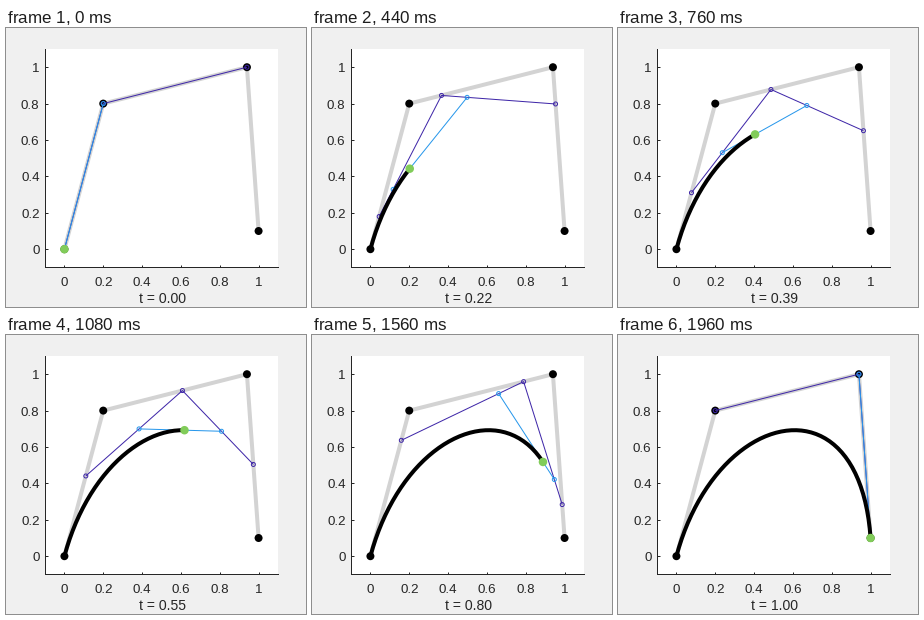
A matplotlib script for the animation above (2 s loop, 300 px wide and 279 px high).

```python
import numpy as np
import matplotlib.pyplot as plt
from matplotlib.animation import FuncAnimation

W, H, DPI = 300, 279, 100
FRAMES, INTERVAL = 50, 40
LEFT, RIGHT, TOP, BOTTOM = 39, 272, 21, 239.4
INK = "#262626"
PURPLE = (0.2422, 0.1504, 0.6603)
BLUE = (0.1540, 0.5902, 0.9218)
GREEN = (0.5044, 0.7993, 0.3480)

CONTROL = np.array([(0, 0), (0.2, 0.8), (0.94, 1), (1, 0.1)])


def px(n):
    """Pixels to points."""
    return n * 72 / DPI


def lerp(points, t):
    """One de Casteljau step."""
    return (1 - t) * points[:-1] + t * points[1:]


def levels(t):
    first = lerp(CONTROL, t)
    second = lerp(first, t)
    return first, second, lerp(second, t)


plt.rcParams["font.family"] = "Liberation Sans"
fig = plt.figure(figsize=(W / DPI, H / DPI), dpi=DPI, facecolor="#f0f0f0")
ax = fig.add_axes([LEFT / W, 1 - BOTTOM / H, (RIGHT - LEFT) / W, (BOTTOM - TOP) / H])
ax.set(xlim=(-0.1, 1.1), ylim=(-0.1, 1.1), facecolor="white")
ax.spines[["top", "right"]].set_visible(False)
for side in ("left", "bottom"):
    ax.spines[side].set(color=INK, linewidth=px(1))

ticks = np.linspace(0, 1, 6)
ax.set_xticks(ticks)
ax.set_yticks(ticks)
ax.tick_params(direction="in", length=px(2.5), width=px(1), color=INK,
               labelbottom=False, labelleft=False)


def label(x, y, text, size=13.33, ha="center"):
    return fig.text(x / W, 1 - y / H, text, fontsize=px(size), color=INK,
                    ha=ha, va="baseline")


for v in ticks:
    part = (v + 0.1) / 1.2
    label(LEFT + part * (RIGHT - LEFT), 258, f"{v:g}")
    label(33.5, BOTTOM - part * (BOTTOM - TOP) + 5, f"{v:g}", ha="right")
caption = label(156.5, 275, "", 14)


def line(color, width, points, z):
    return ax.plot(*points.T, color=color, lw=px(width), zorder=z, clip_on=False,
                   solid_capstyle="butt", solid_joinstyle="round")[0]


def dots(color, size, points, z, edge=0):
    """Circles placed with subpixel accuracy; an edge makes them hollow."""
    return ax.scatter(*points.T, s=px(size) ** 2, zorder=z, clip_on=False,
                      facecolors="none" if edge else color,
                      edgecolors=color if edge else "none", linewidths=px(edge))


line("#d3d3d3", 4, CONTROL, 2)
dots("black", 8, CONTROL, 3)
start = levels(0)
hulls = [(line(color, 1, points, z), dots(color, 4, points, z, edge=1))
         for color, points, z in zip((PURPLE, BLUE), start, (4, 5))]
curve = line("black", 4, start[2], 6)
tip = dots(GREEN, 8.5, start[2], 7)

times = np.linspace(0, 1, FRAMES)
path = np.vstack([levels(t)[2] for t in times])


def update(i):
    for (edge, rings), points in zip(hulls, levels(times[i])):
        edge.set_data(*points.T)
        rings.set_offsets(points)
    curve.set_data(*path[:i + 1].T)
    tip.set_offsets(path[i:i + 1])
    caption.set_text(f"t = {times[i]:.2f}")
    return curve, tip, caption


anim = FuncAnimation(fig, update, frames=FRAMES, interval=INTERVAL,
                     repeat=True, repeat_delay=0, blit=False)
plt.show()
```
